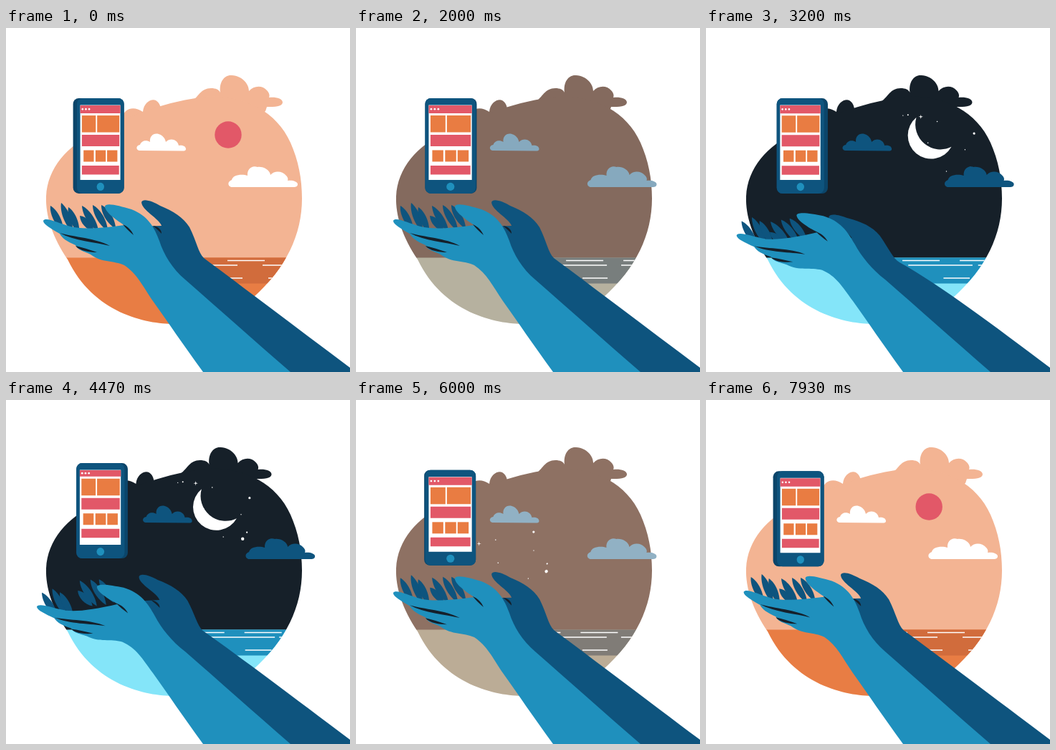
An HTML page with a canvas that plays this animation: 480x480 px, repeating every 7990 ms.

```html
<!DOCTYPE html>
<html lang="en">
<head>
<meta charset="utf-8">
<title>Day and night in hand</title>
<style>
html, body { margin: 0; width: 100%; height: 100%; overflow: hidden; background: #fff; }
canvas { display: block; width: 480px; height: 480px; }
</style>
</head>
<body>
<canvas id="stage" width="480" height="480"></canvas>
<script>
const ctx = document.getElementById('stage').getContext('2d');
const LOOP = 7990, TAU = Math.PI * 2;
const NAVY = '#0e547e', SHADE = '#0b456a', BLUE = '#1f90bd', INK = '#15202b';
const PINK = '#e25868', ORANGE = '#e97c42', WHITE = '#fff';

const clamp = v => Math.max(0, Math.min(1, v));
const ramp = (v, a, b) => clamp((v - a) / (b - a));
const smooth = (v, a, b) => { const k = ramp(v, a, b); return k * k * (3 - 2 * k); };
const mix = (a, b, k) => `rgb(${a.map((v, i) => Math.round(v + (b[i] - v) * k))})`;

// Shapes
const SKY = new Path2D('M56,235 C58,195 85,165 125,145 C165,125 215,105 270,97 C320,90 375,110 397,160 C408,185 413,210 413,238 C413,288 391,335 345,376 C312,404 270,413 235,413 C195,413 122,398 86,323 C65,292 55,262 56,235Z');
const TOP_CLOUD = new Path2D('M260,102 C268,96 272,84 286,84 C293,84 297,86 299,90 C297,75 305,65 315,66 C330,67 339,78 339,88 C346,80 358,80 364,87 C368,91 368,95 367,97 C376,96 386,98 386,104 C385,110 375,110 364,110 L362,116 C350,128 270,118 260,102Z');
const KNOB_CLOUD = new Path2D('M162,128 C163,112 178,108 191,117 C192,104 203,98 209,101 C214,104 215,108 216,112 L200,130Z');
const CLOUD_A = new Path2D('M186,171 C181,170 181,164 187,163 C189,157 196,156 201,159 C200,151 206,146 213,148 C219,150 222,154 223,159 C229,153 239,155 241,164 C248,163 251,166 251,169 C251,171 249,171.500 247,171.500 L186,171Z');
const CLOUD_B = new Path2D('M314,222 C309,220 309,214 315,212 C316,205 329,203 337,206 C336,196 344,191 351,194 C359,193 368,198 369,205 C375,198 386,200 390,205 C393,208 394,210 393,213 C399,212 407,214 407,218 C407,222 403,222 400,222Z');
const MOON = new Path2D('M273,124 A32.500 32.500 0 1 0 322,165 A35 35 0 0 1 273,124Z');
const STARS = [[65, 78, 2.2], [71, 69, 1.1], [75, 21, 1.6], [-18, -2, 1], [-25, -1, .7], [23, 6, .8], [11, 36, .8], [63, 44, .7], [38, 75, .7]];

const DARK_ARM = 'M189,243 C191,237 205,242 215,248 C234,256 247,264 256,278 C266,298 268,313 276,321 C330,361 400,414 480,474 L480,480 L390,480 L240,350 L205,300 L178,277 L217,276 C214,266 189,254 189,243Z';
const LIGHT_ARM = 'M52,269 C55,263 72,272 90,277 C105,281 130,280 165,275 C152,267 138,256 138,249 C139,243 158,248 175,253 C198,262 207,278 214,297 C220,316 232,336 250,351 C297,392 345,435 397,480 L275,480 C248,443 225,409 205,381 C190,359 183,343 165,331 C150,324 134,328 118,316 C108,311 101,311 97,303 C85,298 78,293 75,287 C63,280 52,274 52,269Z';
const CREASES = 'M75,286 C95,292 125,293 145,304 C125,299 95,297 75,286Z M97,304 C106,306 116,309 127,313 C116,313 103,311 97,304Z M163,274 C170,277 175,282 178,289 C172,284 167,279 163,274Z';
const DARK_CREASE = 'M205,276 C212,277 217,281 217,287 C212,282 209,279 205,276Z';
const FINGERS_A = [[62, 248, 80, 284], [77, 244, 93, 285], [87, 250, 102, 286]];
const FINGERS_B = [[103, 262, 123, 284], [106, 248, 129, 284], [121, 247, 142, 283], [133, 247, 153, 280]];

// A joint turns a path about an elbow; the effect fades out along the forearm.
const NEAR = { x: 270, y: 382, turn: .13, from: 510, to: 650 };
const FAR = { x: 335, y: 385, turn: .135, from: 560, to: 720 };

function bend(path, joint, amount) {
  return new Path2D(path.replace(/([\d.]+),([\d.]+)/g, (_, a, b) => {
    const along = .6 * a + 1.4 * b;
    const angle = -joint.turn * amount * (1 - smooth(along, joint.from, joint.to));
    const x = a - joint.x, y = b - joint.y, c = Math.cos(angle), s = Math.sin(angle);
    return `${(joint.x + x * c - y * s).toFixed(2)},${(joint.y + x * s + y * c).toFixed(2)}`;
  }));
}

function leaf([x, y, bx, by]) {
  const len = Math.hypot(bx - x, by - y), nx = (y - by) / len, ny = (bx - x) / len;
  const side = k => `${x + (bx - x) * .25 + nx * k},${y + (by - y) * .25 + ny * k} ${x + (bx - x) * .7 + nx * k},${y + (by - y) * .7 + ny * k}`;
  const back = side(-6.5).split(' ').reverse().join(' ');
  return `M${x},${y} C${side(6.5)} ${bx},${by} C${back} ${x},${y}Z`;
}

function fill(path, color) {
  ctx.fillStyle = color;
  ctx.fill(path);
}

function at(x, y, draw) {
  ctx.save();
  ctx.translate(x, y);
  draw();
  ctx.restore();
}

function dot(x, y, r, color) {
  ctx.fillStyle = color;
  ctx.beginPath();
  ctx.arc(x, y, r, 0, TAU);
  ctx.fill();
}

function box(x, y, right, bottom, color, r = 0) {
  ctx.fillStyle = color;
  ctx.beginPath();
  ctx.roundRect(x, y, right - x, bottom - y, r);
  ctx.fill();
}

function waves(t, swing) {
  const line = (y, left, right) => box(left, y - .7, right, y + .7, WHITE);
  const d = 1 - swing, flow = 80 * smooth(t, 0, 7);
  for (const x of [317, 397]) line(324.5, x - 8 - flow, x + 44 - flow);
  line(331, 275 + 4 * d, 323 + 27 * d);
  line(331, 358 + 12 * d, 420);
  line(349, 297 + 19 * d, 330 + 21 * d);
  line(349, 366 + 20 * d, 420);
}

function scenery(t, swing, night) {
  const sky = mix([243, 180, 147], [22, 32, 41], night);
  const ground = mix([232, 125, 68], [132, 229, 249], night);
  const sea = mix([209, 108, 60], [31, 144, 189], night);
  at((swing - 1) * 8, 0, () => fill(TOP_CLOUD, sky));
  at((swing - 1) * 5, 0, () => fill(KNOB_CLOUD, sky));
  ctx.save();
  ctx.clip(SKY);
  box(40, 60, 420, 321, sky);
  box(40, 320.5, 420, 420, ground);
  box(215, 320.5, 420, 356.5, sea);
  waves(t, swing);
  ctx.restore();
}

function heavens(day, dark) {
  ctx.globalAlpha = 1 - ramp(Math.abs(day), 1.2, 1.75);
  dot(310 - 20 * day - 2 * day ** 3, 149 + 2 * day ** 2 + day ** 4, 18.7, PINK);

  ctx.globalAlpha = ramp(dark, -1.75, -1.2) * (1 - ramp(dark, 1.2, 1.75));
  at(7.4 - 15.5 * dark - 1.5 * dark ** 3, dark ** 2 + dark ** 4 * .6, () => fill(MOON, WHITE));

  ctx.globalAlpha = ramp(dark, -1.8, -1.2) * (1 - ramp(dark, 2, 2.5));
  at(277 - 24.2 * dark - 7 * dark ** 3, 110.8 + .9 * dark + 21.8 * dark ** 2, () => {
    ctx.fillStyle = WHITE;
    ctx.beginPath();
    for (let i = 0; i < 8; i++) {
      const r = i % 2 ? .8 : 3.2;
      ctx.lineTo(r * Math.cos(i * TAU / 8), r * Math.sin(i * TAU / 8));
    }
    ctx.fill();
    ctx.rotate(-.06 * dark ** 3);
    for (const [x, y, r] of STARS) dot(x, y, r, WHITE);
  });
  ctx.globalAlpha = 1;
}

// The page on the screen lags a little behind the bobbing phone.
function phone(yaw, lift) {
  const half = 35.5 - 2.8 * yaw * yaw, side = -5.5 * yaw;
  const left = 131.8 - half, right = 131.8 + half;
  ctx.save();
  ctx.translate(0, -2.5 - 8 * lift);
  box(left + Math.min(side, 0), 98, right + Math.max(side, 0), 231, SHADE, 8);
  box(left, 98, right, 231, NAVY, 8);
  ctx.translate(131.8, 0);
  ctx.scale(half / 35.5, 1);
  ctx.translate(-131.5, 0);
  box(101, 107.5, 161.5, 212, WHITE);
  const page = -1 - 2 * lift;
  box(101, 108, 161.5, 119.5 + page, PINK);
  for (const x of [104.5, 109.5, 114.5]) dot(x, 113.5 + page / 2, 1.4, WHITE);
  at(0, page, () => {
    box(103.5, 122.5, 124.5, 146, ORANGE);
    box(126.5, 122.5, 160, 146, ORANGE);
    box(103.5, 149.5, 160, 165.5, PINK);
    for (const x of [106, 124, 141.5]) box(x, 171, x + 15.5, 187, ORANGE);
    box(103.5, 192.5, 159.5, 205, PINK);
  });
  dot(131.5, 221.5, 5.6, BLUE);
  ctx.restore();
}

function hands(near, far) {
  for (const f of FINGERS_A) fill(bend(leaf(f), NEAR, near * 1.1), NAVY);
  for (const f of FINGERS_B) fill(bend(leaf(f), NEAR, far), NAVY);
  fill(bend(DARK_ARM, FAR, far), NAVY);
  fill(bend(DARK_CREASE, FAR, far), INK);
  fill(bend(LIGHT_ARM, NEAR, near), BLUE);
  fill(bend(CREASES, NEAR, near), INK);
}

function frame(now) {
  const t = (now % LOOP) / LOOP * 8;
  const beat = deg => Math.cos(t * Math.PI - deg * Math.PI / 180);
  const swing = Math.cos(t * TAU / 8);
  const night = ramp(t, 1.35, 2.65) * (1 - ramp(t, 5.3, 6.6));

  ctx.fillStyle = WHITE;
  ctx.fillRect(0, 0, 480, 480);
  scenery(t, swing, night);
  heavens((t + 4) % 8 - 4, t - 4);
  const cloud = mix([255, 255, 255], [14, 84, 126], night);
  at((1 - swing) * 4.5, 0, () => fill(CLOUD_A, cloud));
  at((1 - swing) * 12.5, 0, () => fill(CLOUD_B, cloud));
  phone(Math.cos((t + .3) * TAU / 8), beat(108));
  hands((13.2 + 14.8 * beat(153)) / 28, (9.4 + 10.7 * beat(208)) / 20);
}

const start = performance.now();
(function tick() {
  frame(performance.now() - start);
  requestAnimationFrame(tick);
})();
</script>
</body>
</html>
```
